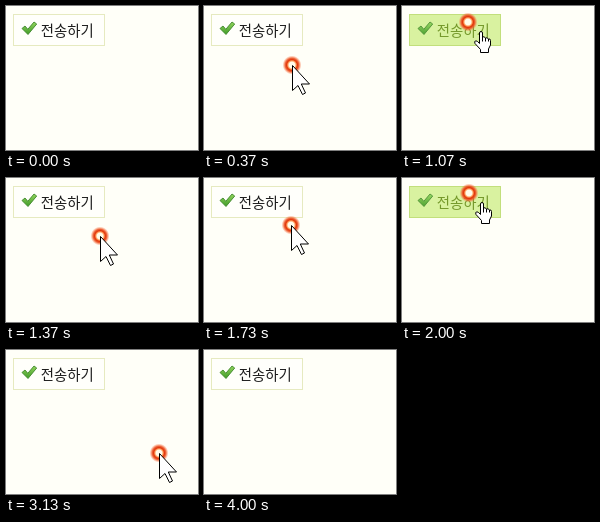
Animation of 192x144 px, one loop 4.33 s. Source, as an HTML page:

```html
<!DOCTYPE html>
<html lang="ko">
<head>
<meta charset="utf-8">
<title>Button hover</title>
<style>
  html, body { margin: 0; width: 100%; height: 100%; overflow: hidden; background: #fffff8; }
  svg { display: block; }
  #box { fill: #fffffb; stroke: #e6eac0; }
  #label { font: 14.4px "Noto Sans CJK KR", "Noto Sans CJK", "Noto Sans CJK JP", sans-serif; fill: #1c1c1c; }
  .hover #box { fill: #d9f2a0; stroke: #c2df7c; }
  .hover #label { fill: #74982a; }
  .hover #check { opacity: .9; }
  .pointer { fill: #fff; stroke: #000; stroke-linejoin: round; }
</style>
</head>
<body>
<svg width="192" height="144" viewBox="0 0 192 144">
  <defs>
    <linearGradient id="green" x2="0" y2="1">
      <stop offset="0" stop-color="#93d65c"/>
      <stop offset="1" stop-color="#3f9a28"/>
    </linearGradient>
    <radialGradient id="glow">
      <stop offset=".3" stop-color="#fffbea"/>
      <stop offset=".44" stop-color="#ff9a55"/>
      <stop offset=".56" stop-color="#e03208"/>
      <stop offset=".72" stop-color="#ec5526" stop-opacity=".9"/>
      <stop offset="1" stop-color="#ff8050" stop-opacity="0"/>
    </radialGradient>
  </defs>
  <g id="button">
    <rect id="box" x="7.5" y="8.5" width="91" height="31"/>
    <path id="check" d="M16 22.5L19 20L21.8 23.3L28 16L30.7 18L22 28.5Z" fill="url(#green)" stroke="#3f872c" stroke-width=".9" stroke-linejoin="round"/>
    <text id="label" x="34.8" y="30">전송하기</text>
  </g>
  <g id="cursor">
    <circle r="9.5" fill="url(#glow)"/>
    <path id="arrow" class="pointer" d="M.5 .5V25.5L6 20.5L10.5 29.5L13.5 28L9.3 19H17.5Z"/>
    <g id="hand" class="pointer" transform="translate(6 9)">
      <path d="M5.5 12.5V2Q5.5 .5 7 .5T8.5 2V6Q10 5 11.5 7Q13 6 14.5 8Q16.5 7.5 16.5 9.5V14L14.5 18V21.5H6.5V18.5L1 12.5Q-.2 10 2 9.8Q3.5 10 5.5 12.5Z"/>
      <path d="M8.5 6V10.5M11.5 7V10.5M14.5 8V10.5" fill="none"/>
    </g>
  </g>
</svg>
<script>
  const LOOP = 4330, STEP = 100 / 3;
  const [button, cursor, arrow, hand] = ['button', 'cursor', 'arrow', 'hand'].map(id => document.getElementById(id));

  const easeOut = p => 1 - (1 - p) ** 2.5;
  const easeInOut = p => p * p * (3 - 2 * p);
  const easeAway = p => p ** 1.1;

  // Each move: first step, last step, start point, end point, easing
  const moves = [
    [5, 21, [133, 158], [68.5, 15], easeOut],
    [21, 25, [68.5, 15], [65.3, 14.5], easeInOut],
    [31, 41, [65.3, 14.5], [94, 58], easeInOut],
    [48, 60, [94, 58], [67, 15], easeInOut],
    [86, 99, [67, 15], [214, 165], easeAway]
  ];

  function position(step) {
    const [from, to, a, b, ease] = moves.findLast(m => step >= m[0]) || moves[0];
    const p = ease(Math.min(1, Math.max(0, (step - from) / (to - from))));
    return a.map((v, i) => Math.round(v + (b[i] - v) * p));
  }

  function show(node, visible) {
    node.setAttribute('visibility', visible ? 'visible' : 'hidden');
  }

  function draw(now) {
    const step = Math.floor((now % LOOP + 4) / STEP);
    const [x, y] = position(step);
    const present = step >= 6 && step < 99;
    const over = present && x >= 7 && x < 99 && y >= 8 && y < 40;
    button.setAttribute('class', over ? 'hover' : '');
    cursor.setAttribute('transform', `translate(${x} ${y})`);
    cursor.style.display = present ? '' : 'none';
    show(arrow, !over);
    show(hand, over);
  }

  let start;
  function tick(now) {
    start ??= now;
    draw(now - start);
    requestAnimationFrame(tick);
  }
  draw(0);
  requestAnimationFrame(tick);
</script>
</body>
</html>
```
